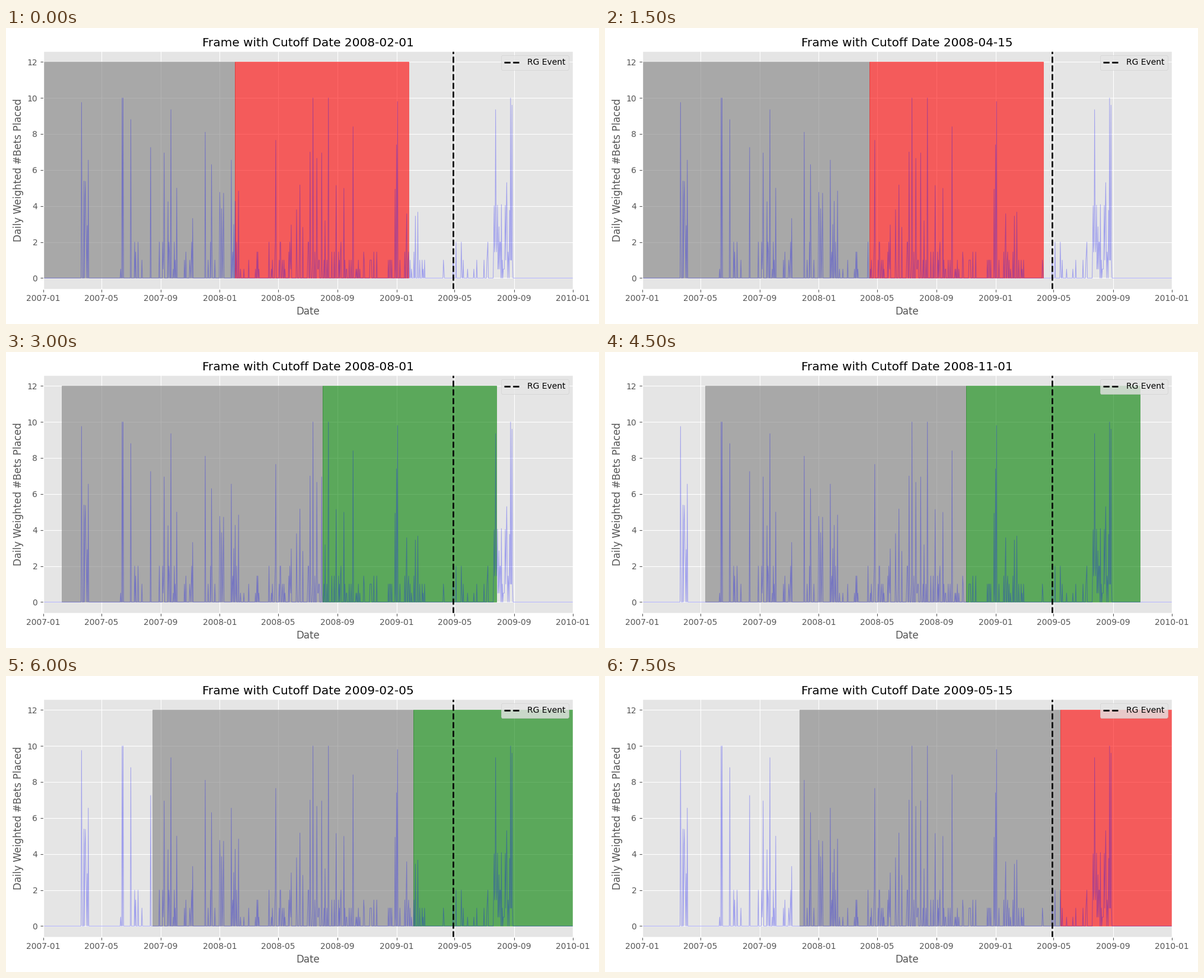
Recreate the animation shown at these times as a matplotlib script. Size 1000 px wide and 500 px high, loop 9 s.

```python
import numpy as np
import matplotlib.pyplot as plt
from matplotlib.animation import FuncAnimation

plt.style.use("ggplot")

FIRST = np.datetime64("2007-01-01")
LAST = np.datetime64("2010-01-01")
EVENT = np.datetime64("2009-04-28")
CUTOFFS = np.array(
    ["2008-02-01", "2008-04-15", "2008-08-01",
     "2008-11-01", "2009-02-05", "2009-05-15"], dtype="datetime64[D]")
LOOKBACK, LOOKAHEAD = 540, 360
TOP = 12

# Tallest days by day index
PEAKS = {79: 9.75, 93: 6.55, 163: 10, 165: 10, 181: 8.8, 222: 7.25,
         250: 6.95, 264: 9.35, 335: 8.1, 348: 6.3, 389: 6.55, 481: 7.65,
         552: 7, 558: 10, 566: 6.65, 576: 6.95, 590: 10, 641: 8.4,
         731: 7.4, 733: 9.8, 936: 9.35, 967: 10, 970: 9.6}

# Active stretches: first day, last day, chance of a bet, share of large ones
STRETCHES = [
    (77, 94, 0.4, 0.5),
    (139, 230, 0.08, 0.1),
    (230, 313, 0.25, 0.2),
    (329, 450, 0.2, 0.25),
    (463, 600, 0.28, 0.2),
    (600, 790, 0.25, 0.15),
    (820, 925, 0.2, 0),
    (932, 972, 0.85, 0.25),
]


def daily_bets(n):
    rng = np.random.default_rng(7)
    bets = np.zeros(n)
    for start, end, chance, large in STRETCHES:
        size = end - start
        small = rng.choice([0.5, 1, 1, 1.45, 2], size)
        tall = rng.uniform(2.8, 5.4, size)
        values = np.where(rng.random(size) < large, tall, small)
        bets[start:end] = values * (rng.random(size) < chance)
    for day, value in PEAKS.items():
        bets[day] = value
    return bets


dates = np.arange(FIRST, LAST + 1)

fig, ax = plt.subplots(figsize=(10, 5), dpi=100)
fig.subplots_adjust(left=0.063, right=0.956, bottom=0.1186, top=0.922)
ax.plot(dates, daily_bets(len(dates)), color="blue", alpha=0.3, linewidth=0.7)
ax.axvline(EVENT, color="black", linestyle="--", linewidth=2, label="RG Event")
ax.set_xlim(FIRST, LAST)
ax.set_ylim(-0.05 * TOP, 1.05 * TOP)
ax.set_xlabel("Date")
ax.set_ylabel("Daily Weighted #Bets Placed")
ax.legend(loc="upper right")

bands = []


def add_band(start, end, color):
    span = [max(start, FIRST), min(end, LAST)]
    bands.append(ax.fill_between(span, 0, TOP, color=color, alpha=0.6))


def update(i):
    while bands:
        bands.pop().remove()
    cutoff = CUTOFFS[i]
    end = cutoff + LOOKAHEAD
    add_band(cutoff - LOOKBACK, cutoff, "gray")
    # Green when the event falls inside the window ahead
    add_band(cutoff, end, "green" if cutoff <= EVENT <= end else "red")
    ax.set_title(f"Frame with Cutoff Date {cutoff}")
    return bands


anim = FuncAnimation(fig, update, frames=len(CUTOFFS), interval=1500,
                     init_func=lambda: [], repeat=True, repeat_delay=0)
plt.show()
```
